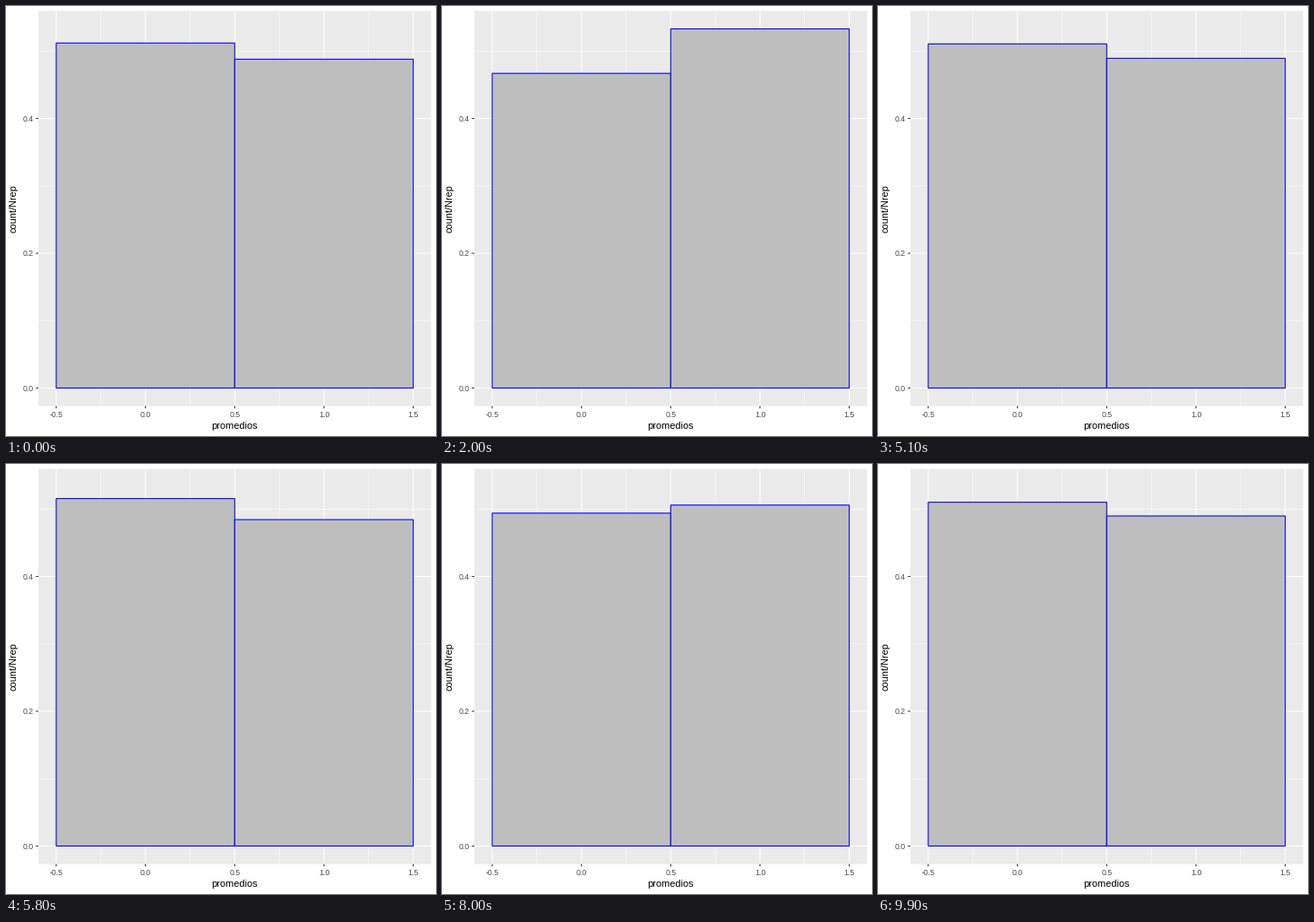
Animation, 480 px wide and 480 px high, one loop 10000 ms. Source, as a matplotlib script:

```python
import matplotlib.pyplot as plt
from matplotlib.animation import FuncAnimation
from matplotlib.patches import Rectangle

SIZE, DPI = 480, 72  # at 72 dpi one point is one pixel
LEFT, TOP, RIGHT, BOTTOM = 36.1, 5.48, 474.52, 446.5
X_UNIT = (RIGHT - LEFT) / 2.2
Y_UNIT = (BOTTOM - TOP) / 1.1 / 0.533
THIN, THICK = 0.53, 1.07

# Share of the left bar in each state; the right bar has the rest.
SHARES = [0.512, 0.467, 0.510, 0.517, 0.494]
HOLD, MOVE = 10, 10
STEP = HOLD + MOVE

plt.rcParams["font.family"] = "Liberation Sans"


def px(x):
    return LEFT + (x + 0.6) * X_UNIT


def py(y):
    return BOTTOM - (BOTTOM - TOP) / 22 - y * Y_UNIT


fig = plt.figure(figsize=(SIZE / DPI, SIZE / DPI), dpi=DPI, facecolor="white")
ax = fig.add_axes([0, 0, 1, 1])
ax.set_xlim(0, SIZE)
ax.set_ylim(SIZE, 0)
ax.axis("off")


def line(x0, y0, x1, y1, color, width, z):
    ax.plot([x0, x1], [y0, y1], color=color, lw=width, zorder=z,
            solid_capstyle="butt", snap=False)


def label(x, y, text, size, color, **kw):
    ax.text(x, y, text, fontsize=size, color=color, zorder=6, **kw)


def bar(x):
    patch = Rectangle((px(x - 0.5), py(0)), X_UNIT, 0, facecolor="#BEBEBE",
                      edgecolor="#0000FF", lw=THICK, joinstyle="miter",
                      snap=False, zorder=4)
    return ax.add_patch(patch)


ax.add_patch(Rectangle((LEFT, TOP), RIGHT - LEFT, BOTTOM - TOP,
                       facecolor="#EBEBEB", lw=0, snap=False, zorder=1))

for x in (-0.25, 0.25, 0.75, 1.25):
    line(px(x), TOP, px(x), BOTTOM, "white", THIN, 2)
for y in (0.1, 0.3, 0.5):
    line(LEFT, py(y), RIGHT, py(y), "white", THIN, 2)

for x in (-0.5, 0, 0.5, 1, 1.5):
    line(px(x), TOP, px(x), BOTTOM, "white", THICK, 3)
    line(px(x), BOTTOM, px(x), BOTTOM + 2.74, "#333333", THICK, 5)
    label(px(x), 459, f"{x:.1f}", 8.8, "#4D4D4D", ha="center", va="baseline")
for y in (0, 0.2, 0.4):
    line(LEFT, py(y), RIGHT, py(y), "white", THICK, 3)
    line(LEFT - 2.74, py(y), LEFT, py(y), "#333333", THICK, 5)
    label(31.2, py(y) + 3.2, f"{y:.1f}", 8.8, "#4D4D4D",
          ha="right", va="baseline")

label(px(0.5), 472, "promedios", 11, "black", ha="center", va="baseline")
label(13.3, (TOP + BOTTOM) / 2, "count/Nrep", 11, "black", rotation=90,
      ha="right", va="center", rotation_mode="default")

bars = [bar(0), bar(1)]


def update(i):
    state, step = divmod(i, STEP)
    t = max(0, step - HOLD) / MOVE
    start, end = SHARES[state], SHARES[(state + 1) % len(SHARES)]
    share = start + (end - start) * t
    for patch, value in zip(bars, (share, 1 - share)):
        patch.set_height(-value * Y_UNIT)
    return bars


anim = FuncAnimation(fig, update, frames=STEP * len(SHARES), interval=100,
                     repeat=True, repeat_delay=0, blit=False)
plt.show()
```
